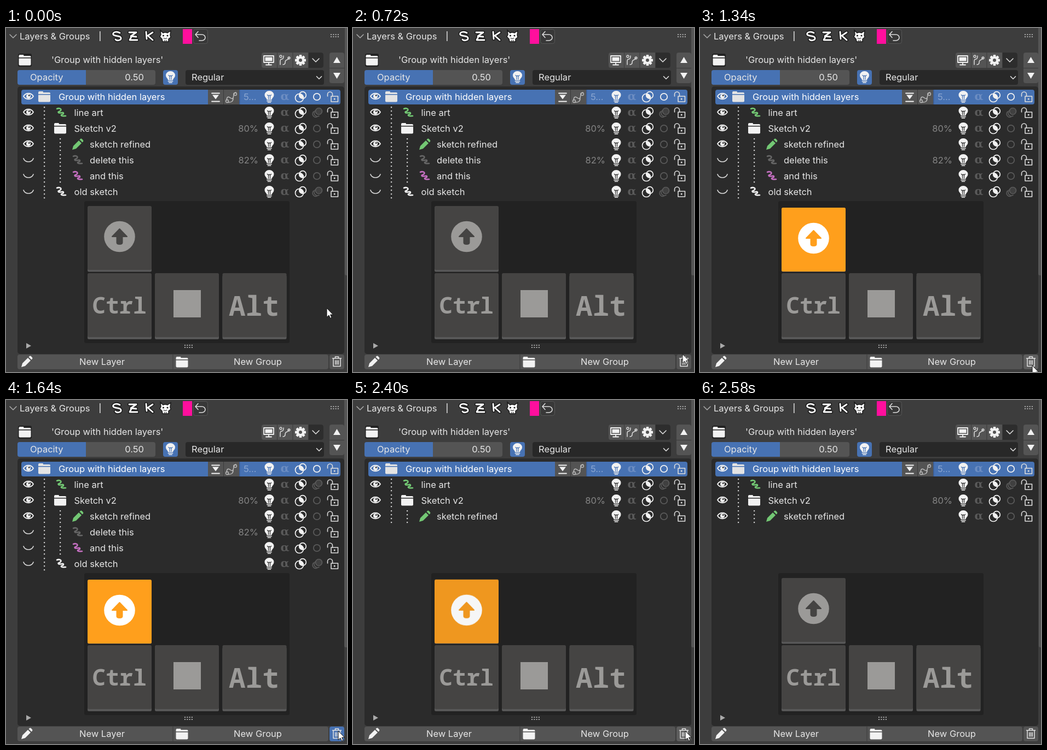
Recreate the animation shown at these times as an HTML page. Size 623 by 630 pixels, loop 3.32 s.

```html
<!DOCTYPE html>
<html lang="en">
<head>
<meta charset="utf-8">
<title>Layers panel</title>
<style>
html, body { margin: 0; width: 100%; height: 100%; overflow: hidden; background: #3d3d3d; }
svg { display: block; width: 623px; height: 630px; }
text { font: 16.5px Inter, "Open Sans", sans-serif; fill: #e6e6e6; white-space: pre; }
.mono { font-family: "Noto Sans Mono", "DejaVu Sans Mono", monospace; fill: #9b9a98; text-anchor: middle; }
.alpha { font: bold 21px "DejaVu Serif", "Noto Serif", serif; text-anchor: middle; }
.line { fill: none; stroke-linecap: round; stroke-linejoin: round; }
</style>
</head>
<body>
<svg id="stage" viewBox="0 0 623 630"></svg>
<script>
const LOOP = 3320;
const BLUE = '#4772b3', TOOL = '#545454', DARK = '#2b2b2b', WHITE = '#f2f2f2';
const ORANGE = '#ff9f1c', KEY = '#454443', KEY_ICON = '#9b9a98';

// Shape helpers
const rect = (x, y, w, h, fill, r = 0, extra = '') =>
  `<rect x="${x}" y="${y}" width="${w}" height="${h}" rx="${r}" fill="${fill}" ${extra}/>`;
const text = (x, y, str, extra = '') => `<text x="${x}" y="${y}" ${extra}>${str}</text>`;
const line = (d, color = WHITE, width = 1.6) =>
  `<path class="line" d="${d}" stroke="${color}" stroke-width="${width}"/>`;
const fill = (d, color = WHITE, extra = '') => `<path d="${d}" fill="${color}" ${extra}/>`;
const disc = (x, y, r, color, extra = '') => `<circle cx="${x}" cy="${y}" r="${r}" fill="${color}" ${extra}/>`;
const ring = (x, y, r, color, width = 1.7) =>
  disc(x, y, r, 'none', `stroke="${color}" stroke-width="${width}"`);
const at = (x, y, body, extra = '') => `<g transform="translate(${x} ${y})" ${extra}>${body}</g>`;
const anchor = a => `text-anchor="${a}"`;

// Icons, all centred on 0,0
const folder = (color = WHITE) =>
  fill('M-11-8q0-2 2-2h6q1 0 1 2h11q2 0 2 2v1h-22z', color) +
  fill('M-11-3.5h22v11q0 2-2 2h-18q-2 0-2-2z', color);
const squiggle = color =>
  line('M-8-7C-4-9 1-7-1-4S-7-2-5 0 4-2 4 1-1 3 0 5 4 6 8 6', color, 2.6);
const pencil = color =>
  fill('M-10 10l2-7L2-7l5 5L-3 8z', color) + fill('M3.5-8.5l1.5-1.5q1.5-1 3 .5l1.5 1.5q1.5 1.5.5 3L8.500-3.500z', color);
const eye = () =>
  line('M-9 0C-5-7 5-7 9 0C5 7-5 7-9 0z', WHITE, 1.8) + disc(0, 0, 4, WHITE) + disc(1.2, -1.3, 1.4, DARK);
const closedEye = () => line('M-9-2C-6 6 6 6 9-2', '#d8d8d8', 1.7);
const bulb = bg =>
  fill('M-4.500 5.500C-4.500 2.500-8.500 1-8.500-3.500a8.500 7.500 0 0 1 17 0C8.500 1 4.500 2.500 4.500 5.500z') +
  line('M-3.500-3.500l2 2 1.500-1.500 1.500 1.500 2-2M-1.500-1V4M1.500-1V4', bg, 1.2) +
  line('M-4 7.500H4M-2.500 10H2.500', WHITE, 1.7);
const overlap = () =>
  ring(-2.5, 2, 7.5, WHITE) + ring(3.5, -3, 6.3, WHITE) +
  fill('M-2.500-5.500A7.500 7.500 0 0 1 5 2.500A6.300 6.300 0 0 1-2.500-5.500z');
const mask = color => ring(0, 0, 6.2, color, 1.8);
const onion = color => disc(3.500, -2.500, 5.800, color, 'opacity=".45"') +
  ring(3.5, -2.5, 6, color) + line('M-2-4.500A6 6 0 0 0 4 6M-6-2A6 6 0 0 0 0 8', color, 1.6);
const lock = () =>
  line('M-9.500-1v-3.500a4.500 4.500 0 0 1 9 0V-1', '#dedede', 1.6) +
  line('M-3-1H9.500V9H-3z', '#dedede', 1.6) + disc(3.2, 4, 1.5, '#dedede');
const chevron = (w, h, color) => line(`M${-w} ${-h}L0 ${h}L${w} ${-h}`, color, 1.6);
const grip = (x, y) => [0, 1, 2, 3].map(i =>
  rect(x + i * 4.3, y, 2, 2, '#aaa') + rect(x + i * 4.3, y + 4, 2, 2, '#aaa')).join('');
const gear = () => [0, 45, 90, 135].map(a =>
  rect(-2.4, -10, 4.8, 20, WHITE, 1, `transform="rotate(${a})"`)).join('') +
  disc(0, 0, 7.2, WHITE) + disc(0, 0, 3, TOOL);

function header() {
  const strokes = ['M208 9C202 5 194 8 196 12S209 13 210 18S202 24 200 21',
    'M225 8L238 8L228 15L238 16M229 16L226 22L240 22', 'M256 7L257 20M268 8L259 14L268 22'];
  const cat = 'M282 4L287 9Q291 7 295 9L301 5L300 13L301 17L297 20L297 25H286L285 20L281 16L283 12z';
  return at(13, 15, chevron(6, 3, '#a8a8a8')) + text(25, 21, 'Layers &amp; Groups') +
    rect(171, 6, 1.6, 18, '#d5d5d5') +
    strokes.map(d => line(d, '#1b1b1b', 6) + line(d, '#fff', 2.8)).join('') +
    fill(cat, '#fff', 'stroke="#1b1b1b" stroke-width="1.5"') +
    disc(287.5, 14, 1.6, '#222') + disc(295, 14, 1.6, '#222') +
    line('M288 18.500l3 1 3-1M290 22v2M293 22v2', '#222', 1.1) +
    rect(323, 2, 17, 27, '#ff0f9d') +
    rect(342.5, 2.5, 26, 26, '#383838', 4, 'stroke="#565656"') +
    line('M351 6.500L346 12L351 17.500M346.500 12H358a6 5.500 0 0 1 0 11H353', '#ddd', 1.6) +
    grip(593, 11);
}

function controls() {
  const monitor = line('M-9-8H9V4H-9zM-5 8.500H5M0 4V8', WHITE, 1.8) + rect(-6.5, -5.5, 13, 7, WHITE);
  const curve = line('M-8 8V2Q-8-2-5-2T-2-8M-3 8Q1 8 1 4T5-1L8-4', '#ddd', 1.5) +
    ring(-7, -7, 2, '#ddd', 1.3) + ring(8, -4, 2, '#ddd', 1.3);
  return rect(22, 47, 25, 24, '#222', 3) + at(34.5, 59, folder()) +
    text(83, 64, "'Group with hidden layers'") +
    rect(467, 45, 113, 28, TOOL, 4) + fill('M552 45h24q4 0 4 4v20q0 4-4 4h-24z', '#2d2d2d') +
    [495, 523.5, 552].map(x => rect(x, 45, 1, 28, '#3b3b3b')).join('') +
    at(480, 59, monitor) + at(509, 59, curve) + at(538, 59, gear()) + at(566, 59, chevron(6, 3, '#ddd')) +
    rect(591, 45, 27, 56, TOOL, 4) + rect(591, 73, 27, 1, '#3b3b3b') +
    fill('M598 64L604.500 53L611 64z') + fill('M598 82L604.500 93L611 82z') +
    rect(21, 77, 252, 27, TOOL, 4) + fill('M146 77H25q-4 0-4 4v19q0 4 4 4H146z', BLUE) +
    text(44, 96, 'Opacity') + text(252, 96, '0.50', anchor('end')) +
    rect(287, 77, 27, 27, BLUE, 4) + at(300.500, 90, bulb(BLUE)) +
    rect(328, 77, 253, 27, '#282828', 4) + text(339, 96, 'Regular') + at(572, 91, chevron(4.5, 2.3, '#ddd'));
}

const GREEN = '#73c874';
const layers = [
  { name: 'Group with hidden layers', depth: 0, icon: folder('#e4e4e4'), open: true, selected: true },
  { name: 'line art', depth: 1, icon: squiggle(GREEN), open: true, skin: true },
  { name: 'Sketch v2', depth: 1, icon: folder(), open: true, opacity: '80%' },
  { name: 'sketch refined', depth: 2, icon: pencil(GREEN), open: true },
  { name: 'delete this', depth: 2, icon: squiggle('#666'), opacity: '82%' },
  { name: 'and this', depth: 2, icon: squiggle('#c46fc0') },
  { name: 'old sketch', depth: 1, icon: squiggle(WHITE), skin: true },
];

function selection() {
  return rect(28, 113, 583, 27, BLUE, 4) + rect(369, 113, 28, 27, TOOL) + rect(398, 113, 28, 27, TOOL) +
    rect(397, 113, 1, 27, '#3b3b3b') + rect(426, 113, 1.5, 27, '#3a5d94') +
    line('M376 119.500H390M376 134.500H390', WHITE, 1.8) + fill('M377 122.500H389L383 130.500z') +
    line('M403 132Q404 123 410 128T416 120L420 118M405 136Q415 137 415 129', '#bbb', 1.5) +
    ring(419, 121, 2.5, '#bbb', 1.3) + ring(404, 134, 2.5, '#bbb', 1.3) +
    text(434, 132, '5...', 'style="fill:#8ba6d1"');
}

function layerRow(layer, i) {
  const y = 126 + i * 29, dim = '#5a5a5a';
  const bg = layer.selected ? BLUE : DARK;
  const textX = [96, 124.5, 153][layer.depth];
  const dots = [70, 99].slice(0, layer.depth).map(x =>
    [-11, -4, 3, 10].map(dy => rect(x - 1, y + dy, 2.2, 2.2, '#d0d0d0')).join('')).join('');
  return (layer.selected ? selection() : '') + dots +
    at(41, y - 1, layer.open ? eye() : closedEye()) +
    at([70, layer.icon === layers[2].icon ? 99 : 101, 131][layer.depth], y, layer.icon) +
    text(textX, y + 6, layer.name, layer.selected ? 'style="fill:#fff"' : '') +
    (layer.opacity ? text(461, y + 6, layer.opacity, anchor('end') + ' style="fill:#858585"') : '') +
    at(481, y, bulb(bg)) +
    text(509.5, y + 6, 'α', `class="alpha" style="fill:${layer.selected ? '#6c8dc2' : dim}"`) +
    at(538.5, y, overlap()) +
    at(568, y, layer.skin ? onion(dim) : mask(layer.selected ? WHITE : dim)) +
    at(597, y, lock());
}

function list() {
  const shown = layers.map(layerRow);
  return rect(21, 107, 597, 490, DARK, 5) + shown.slice(0, 4).join('') +
    `<g id="hidden">${shown.slice(4).join('')}</g>` +
    fill('M37 577L46 582L37 587z', '#aaa') + grip(326, 580);
}

function keys() {
  const cap = (x, y) => rect(x, y + 4, 117, 117, '#585858', 2.5) + rect(x, y, 117, 117, KEY, 2.5);
  const arrow = 'M207.500 368L221 382H212.500V393q0 3-5 3t-5-3V382H194z';
  return rect(143, 317, 375, 260, '#222', 3) +
    rect(149, 330, 117, 116.5, '#585858', 2.5) +
    `<g id="shift">${rect(149, 326, 117, 117, KEY, 2.5, 'id="cap"')}${disc(207.5, 382, 28.3, KEY_ICON, 'id="disc"')}` +
    fill(arrow, KEY, `id="arrow" stroke="${KEY}" stroke-width="2" stroke-linejoin="round"`) + '</g>' +
    cap(149, 449) + cap(272, 449) + cap(395.5, 449) +
    text(207, 523, 'Ctrl', 'class="mono" style="font-size:41.5px;font-weight:600"') +
    rect(306, 480, 50, 50, KEY_ICON) +
    text(453, 527, 'Alt', 'class="mono" style="font-size:51px;font-weight:700"');
}

function footer() {
  const trash = line('M-8-6H8M-3-6V-9H3V-6M-6.500-5.500V8.500H6.500V-5.500M-2.700-2V5M0-2V5M2.700-2V5', '#e4e4e4', 1.5);
  return rect(21, 598, 568, 27, TOOL, 4) + rect(304.5, 598, 1, 27, '#3b3b3b') +
    at(38, 611, pencil(WHITE)) + text(175.5, 617, 'New Layer', anchor('middle')) +
    at(321.5, 612, folder()) + text(460, 617, 'New Group', anchor('middle')) +
    rect(591, 598, 27, 27, TOOL, 4, 'id="bin"') + at(604.5, 611, trash);
}

const pointer = fill('M0 0V16.500L3.900 13L6.500 18.500L9 17.300L6.600 12H11.500z', '#fff',
  'id="pointer" stroke="#111" stroke-width="1"');

const stage = document.getElementById('stage');
stage.innerHTML = rect(0, 0, 623, 630, '#3d3d3d') + header() + controls() + list() + keys() + footer() +
  rect(618, -6, 8, 459, '#555', 3, 'id="scroll"') + pointer;

// Steps are [ms, value]; two steps at one time make a hard change
function play(id, prop, steps) {
  const all = [[0, steps[0][1]], ...steps, [LOOP, steps[steps.length - 1][1]]];
  document.getElementById(id).animate(
    all.map(([ms, value]) => ({ offset: ms / LOOP, [prop]: value })),
    { duration: LOOP, iterations: Infinity });
}
const move = (x, y) => `translate(${x}px, ${y}px)`;
const press = (id, prop, rest, down) =>
  play(id, prop, [[775, rest], [892, down], [2391, down], [2508, rest]]);

press('shift', 'transform', move(0, 0), move(0, 3));
press('cap', 'fill', KEY, ORANGE);
press('disc', 'fill', KEY_ICON, '#ffffff');
press('arrow', 'fill', KEY, ORANGE);
press('arrow', 'stroke', KEY, ORANGE);

play('pointer', 'transform', [
  [30, move(586, 513)], [90, move(586, 512.5)], [420, move(586, 512.5)], [520, move(589, 526)],
  [620, move(595, 562)], [720, move(602, 597)], [800, move(606, 613)], [890, move(607, 618)],
  [1340, move(607, 618)], [1480, move(607, 611)], [1600, move(607, 606)],
  [2460, move(607, 606)], [2500, move(608, 616)], [2565, move(608, 634)]]);

play('bin', 'fill', [[735, TOOL], [735, '#5e5e5e'], [1625, '#5e5e5e'], [1625, BLUE],
  [1960, BLUE], [1960, '#5e5e5e'], [2550, '#5e5e5e'], [2550, TOOL]]);
play('hidden', 'opacity', [[1960, 1], [1960, 0]]);
play('scroll', 'transform', [[600, move(1, 0)], [720, move(0, 0)], [2450, move(0, 0)], [2570, move(1, 0)]]);
</script>
</body>
</html>
```
